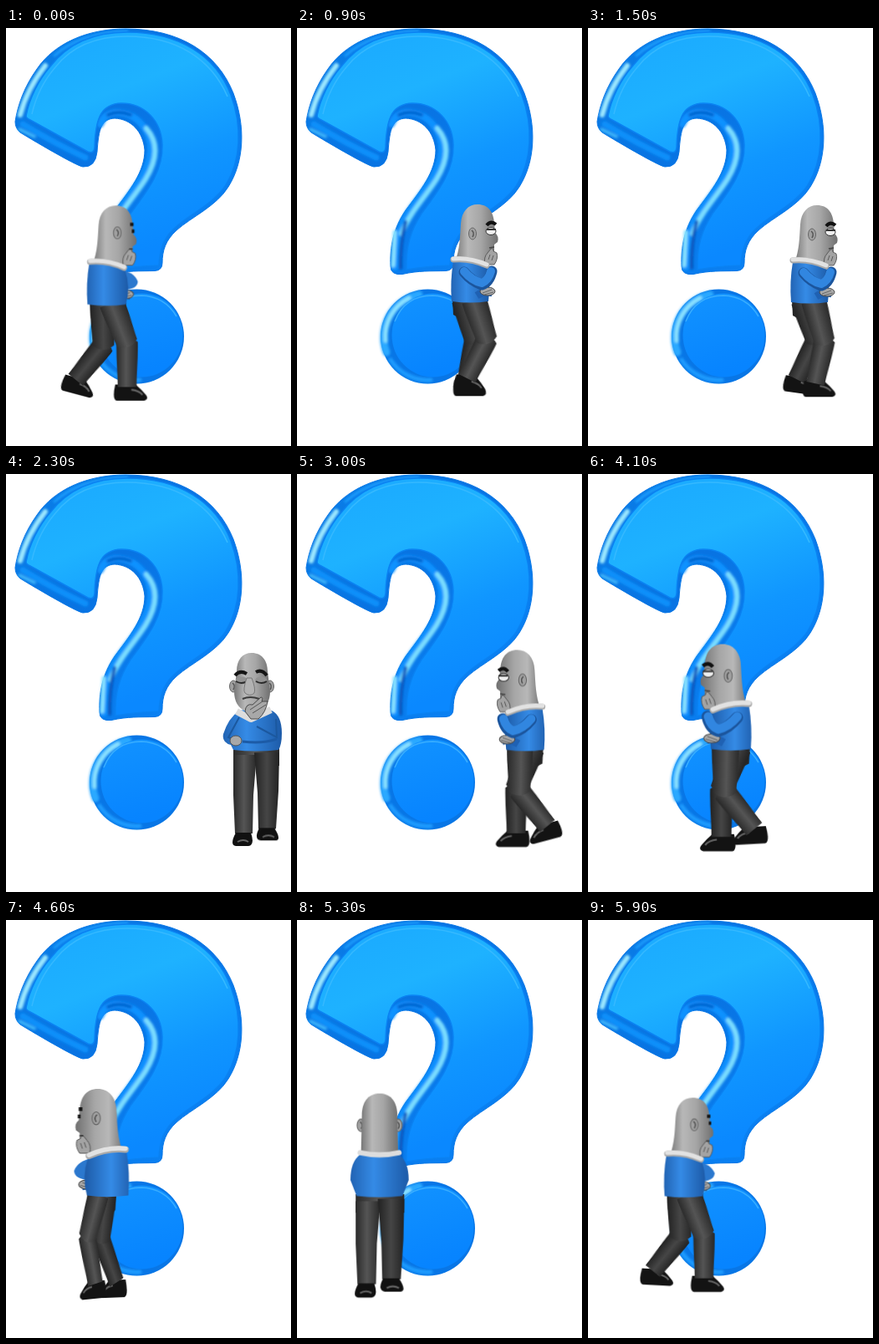
These frames come from a looping animation (341 px wide and 500 px high, 6000 ms). An HTML page without scripts:

```html
<!DOCTYPE html>
<html lang="en">
<head>
<meta charset="utf-8">
<title>Pacing thinker</title>
<style>
html, body { margin: 0; width: 100%; height: 100%; overflow: hidden; background: #fff; }
svg { display: block; width: 100%; height: 100%; }

.walker, .turn, .view { animation: 6s -5ms infinite step-end; }
.walker { animation-name: pace; }
.turn { animation-name: turn; }
.side { animation-name: side; }
.rear { animation-name: rear; }
.stride { animation-name: stride; }
.front { animation-name: front; }
.back { animation-name: back; }
.look { animation: look 6s -5ms infinite steps(5); }

.thigh, .shin, .foot { animation: 1.2s var(--lag, -5ms) infinite steps(3); }
.thigh { animation-name: thigh; }
.shin { animation-name: shin; }
.foot { animation-name: foot; }
.far { --lag: -605ms; }
.lift { animation: lift 1.2s var(--lag, -5ms) infinite steps(3); }

/* One lap; the held steps give ten poses a second */
@keyframes pace {
  0% { transform: translate(122px, 447px) scale(1.02); animation-timing-function: steps(9); }
  15% { transform: translate(207px, 441px) scale(1); animation-timing-function: steps(6); }
  25% { transform: translate(265px, 442px) scale(1); animation-timing-function: steps(3); }
  30% { transform: translate(287px, 443px) scale(1); animation-timing-function: steps(5); }
  38.333% { transform: translate(299px, 444px) scale(1); animation-timing-function: steps(5); }
  46.667% { transform: translate(281px, 446px) scale(1.02); animation-timing-function: steps(3); }
  51.667% { transform: translate(269px, 448px) scale(1.035); animation-timing-function: steps(5); }
  60% { transform: translate(222px, 450px) scale(1.065); animation-timing-function: steps(10); }
  76.667% { transform: translate(120px, 455px) scale(1.1); animation-timing-function: steps(5); }
  85% { transform: translate(93px, 452px) scale(1.07); animation-timing-function: steps(8); }
  98.333% { transform: translate(116px, 446px) scale(1.015); animation-timing-function: steps(1); }
  100% { transform: translate(122px, 447px) scale(1.02); }
}
@keyframes turn { 0%, 85% { transform: scaleX(1); } 46.66% { transform: scaleX(-1); } }
@keyframes side { 0%, 30%, 70% { visibility: hidden; } 6.66%, 46.66% { visibility: visible; } 100% { visibility: hidden; } }
@keyframes rear { 0%, 70%, 90% { visibility: visible; } 6.66%, 81.66% { visibility: hidden; } 100% { visibility: visible; } }
@keyframes stride {
  0%, 46.66%, 90% { visibility: visible; transform: none; }
  75% { visibility: visible; transform: translateX(5px) scaleX(.74); }
  30%, 81.66% { visibility: hidden; }
  100% { visibility: visible; transform: none; }
}
@keyframes front { 0%, 46.66%, 100% { visibility: hidden; } 30% { visibility: visible; } }
@keyframes back { 0%, 90%, 100% { visibility: hidden; } 81.66% { visibility: visible; } }
@keyframes look { 0%, 30% { transform: translateX(10px); } 38.333% { transform: none; } 46.667%, 100% { transform: translateX(-6px); } }

/* The legs reach full spread just before each change of foot */
@keyframes thigh {
  0%, 91.667%, 100% { transform: rotate(-21deg); }
  25% { transform: rotate(-15deg); animation-timing-function: steps(2); }
  41.667%, 50% { transform: rotate(-1deg); }
  75% { transform: rotate(-18deg); animation-timing-function: steps(2); }
}
@keyframes shin {
  0%, 91.667%, 100% { transform: rotate(21deg); }
  25% { transform: rotate(27deg); animation-timing-function: steps(2); }
  41.667%, 50% { transform: rotate(40deg); }
  75% { transform: rotate(45deg); animation-timing-function: steps(2); }
}
@keyframes foot {
  0%, 91.667%, 100% { transform: rotate(0deg); }
  25% { transform: rotate(-12deg); animation-timing-function: steps(2); }
  41.667% { transform: rotate(-36deg); animation-timing-function: steps(1); }
  50% { transform: rotate(-24deg); }
  75% { transform: rotate(-19deg); animation-timing-function: steps(2); }
}
@keyframes lift { 0%, 50%, 100% { transform: none; } 75% { transform: translateY(-4px); } }
</style>
</head>
<body>
<svg viewBox="0 0 341 500">
<defs>
  <linearGradient id="face" x1="0" y1="0" x2=".35" y2="1">
    <stop offset="0" stop-color="#1aa8ff"/><stop offset=".35" stop-color="#1eb2ff"/>
    <stop offset=".7" stop-color="#1096ff"/><stop offset="1" stop-color="#0a88ff"/>
  </linearGradient>
  <linearGradient id="rim" x1="0" y1="0" x2="1" y2="1">
    <stop offset="0" stop-color="#0a7fe8"/><stop offset=".4" stop-color="#0873e2"/><stop offset="1" stop-color="#0a86fa"/>
  </linearGradient>
  <linearGradient id="dot" x1="0" y1="0" x2=".3" y2="1">
    <stop offset="0" stop-color="#1293ff"/><stop offset="1" stop-color="#0784ff"/>
  </linearGradient>
  <linearGradient id="skin">
    <stop offset="0" stop-color="#777"/><stop offset=".3" stop-color="#b8b8b8"/>
    <stop offset=".6" stop-color="#a6a6a6"/><stop offset="1" stop-color="#707070"/>
  </linearGradient>
  <linearGradient id="shirt">
    <stop offset="0" stop-color="#2264b4"/><stop offset=".4" stop-color="#358be6"/><stop offset="1" stop-color="#1d5ba8"/>
  </linearGradient>
  <linearGradient id="cloth">
    <stop offset="0" stop-color="#2a2a2a"/><stop offset=".45" stop-color="#555"/><stop offset="1" stop-color="#282828"/>
  </linearGradient>
  <linearGradient id="shade">
    <stop offset="0" stop-color="#222"/><stop offset=".5" stop-color="#464646"/><stop offset="1" stop-color="#222"/>
  </linearGradient>
  <filter id="soft" x="-30%" y="-30%" width="160%" height="160%"><feGaussianBlur stdDeviation="1.6"/></filter>

  <path id="thigh" d="M-15-4C-15 18-13 34-12.5 46Q0 56 12.5 46C13 30 15 16 15-4Z"/>
  <path id="shin" d="M-12.5-1Q0-10 12.5-1C13 18 11 36 11 52H-11C-11 36-13 18-12.5-1Z"/>
  <g id="shoe">
    <path d="M-14-1Q-18 17-12 18H20Q26 16 22 11 16 4 10-1Z" fill="#131313"/>
    <path d="M5 5Q14 6 18 11" fill="none" stroke="#666" stroke-width="2"/>
  </g>
  <g id="hand" fill="#a3a3a3" stroke="#555" stroke-width=".9">
    <path d="M-6 8Q-8-1-3-6L1-11Q4-12 4-8L8-6Q10 1 5 8Z"/>
    <path d="M0-4L-2 2M4-3L2 3" fill="none"/>
  </g>
  <path id="skull" d="M-18-161C-12-176-12-192-11-207C-10-222-2-230 9-230C22-230 28-221 29-208L30-196Q35-192 33-185L29-182 29-172Q28-165 22-160Z" fill="url(#skin)"/>
  <g id="forearm">
    <path d="M8-121Q18-127 27-124" fill="none" stroke="#1f61b3" stroke-width="9"/>
    <ellipse cx="21" cy="-126" rx="9" ry="5" fill="#a8a8a8" stroke="#4b4b4b"/>
    <path d="M15-124L26-128M17-122L28-125" stroke="#555" stroke-width=".8"/>
  </g>
  <g id="collar" fill="none" stroke-linecap="round">
    <path d="M-20-164Q0-166 20-157" stroke="#aaa" stroke-width="7"/>
    <path d="M-20-165Q0-167 20-158" stroke="#e2e2e2" stroke-width="5"/>
  </g>
  <g id="ear">
    <ellipse rx="4.5" ry="7" fill="#a0a0a0" stroke="#666"/>
    <path d="M-1-4Q3-1 0 4" fill="none" stroke="#555" stroke-width="1.5"/>
  </g>

  <g id="frontlegs">
    <path d="M-27-116H28V-95H-27Z" fill="url(#cloth)"/>
    <g class="lift">
      <path d="M-27-108H1L-3-60-4-14H-25L-27-60Z" fill="url(#cloth)"/>
      <path d="M-24-15H-6Q-1 0-9 1H-24Q-32 0-24-15Z" fill="#111"/>
      <path d="M-22-4Q-15-8-9-4" fill="none" stroke="#666" stroke-width="2"/>
    </g>
    <g class="lift far">
      <path d="M-2-108H28L27-62 24-17H3L2-60Z" fill="url(#shade)"/>
      <path d="M4-18H22Q31-4 24-3H6Q-3-4 4-18Z" fill="#111"/>
      <path d="M8-7Q15-11 22-7" fill="none" stroke="#666" stroke-width="2"/>
    </g>
  </g>
</defs>

<g id="question">
  <path d="M11 112C14 92 22 70 37 49C58 18 98 1 143 1C208 1 253 30 272 78C287 118 285 160 266 190C252 213 222 226 204 242C191 254 187 266 187 281Q187 290 178 290.500C160 291 146 290 126 294.500Q112 296 112 285C111 262 115 240 130 218C148 194 166 172 166 146C164 124 150 109 130 108C114 109 111 120 109 148Q107 167 92 166C84 165 30 133 17 125Q11 120 11 112Z" fill="url(#rim)" stroke="#0876e6"/>
  <g fill="none" stroke-linecap="round" filter="url(#soft)">
    <path d="M20 115Q60 139 95 155" stroke="#0c90fa" stroke-width="7"/>
    <path d="M16 121L34 130" stroke="#4bc4ff" stroke-width="3"/>
    <path d="M17 104C22 84 33 63 47 45" stroke="#9ce8ff" stroke-width="6"/>
    <path d="M58 33C80 13 110 5 145 4" stroke="#1aa0ff" stroke-width="3"/>
    <path d="M113 115Q117 103 131 101C158 101 174 124 173 147C171 174 154 191 138 214C123 234 117 256 117 286" stroke="#0f92ff" stroke-width="8"/>
    <path d="M168 120C183 137 181 158 167 181C153 203 134 222 125 246" stroke="#7addff" stroke-width="6"/>
    <path d="M117 244L115 284" stroke="#8ae4ff" stroke-width="5"/>
    <path d="M130 232Q123 258 124 287" stroke="#0755bb" stroke-width="4"/>
    <path d="M122 104Q134 98 149 104" stroke="#0660cc" stroke-width="4"/>
  </g>
  <path d="M24 105C28 84 39 62 53 46C76 16 110 5 145 5C207 5 251 33 269 80C283 118 281 159 263 188C249 210 219 223 201 240C189 251 184 264 183 284Q155 285 131 289C130 262 136 242 149 222C168 196 188 172 187 140C186 110 165 90 138 90C115 91 107 105 106 143Q105 151 98 148L29 110Q24 108 24 105Z" fill="url(#face)" stroke="#0a82f2" stroke-width="1.500"/>
  <path d="M31 103C36 81 46 62 59 47C80 20 112 10 145 10C203 10 245 36 265 82" fill="none" stroke="#35b9ff" stroke-width="1.500"/>
  <circle cx="156.500" cy="369" r="56.500" fill="#0876e6"/>
  <g fill="none" stroke-linecap="round" filter="url(#soft)">
    <path d="M107 388A52 52 0 0 1 146 319" stroke="#2ba9ff" stroke-width="9"/>
    <path d="M106 374A52 52 0 0 1 134 323" stroke="#8be2ff" stroke-width="5"/>
    <path d="M112 397A53 53 0 0 0 160 421" stroke="#1f9cff" stroke-width="5"/>
  </g>
  <ellipse cx="162.500" cy="367.500" rx="49" ry="50" fill="url(#dot)"/>
  <path d="M117 351Q129 320 162 320Q190 321 204 345" fill="none" stroke="#39aeff" stroke-width="1.500"/>
</g>

<g class="walker">
  <g class="turn">
    <g class="view stride">
      <path d="M-21-116H21L20-98Q0-86-20-98Z" fill="url(#shade)"/>
      <g class="far" transform="translate(-6 -112)"><g class="thigh" fill="url(#shade)">
        <g transform="translate(0 46)"><g class="shin">
          <g transform="translate(0 50)"><g class="foot"><use href="#shoe"/></g></g>
          <use href="#shin"/>
        </g></g>
        <use href="#thigh"/>
      </g></g>
      <g transform="translate(6 -112)"><g class="thigh" fill="url(#cloth)">
        <g transform="translate(0 46)"><g class="shin">
          <g transform="translate(0 50)"><g class="foot"><use href="#shoe"/></g></g>
          <use href="#shin"/>
        </g></g>
        <use href="#thigh"/>
      </g></g>
    </g>

    <g class="view side">
      <use href="#skull"/>
      <path d="M-20-162Q0-164 20-155Q25-136 22-114Q0-111-22-114Q-24-138-20-162Z" fill="url(#shirt)"/>
      <use href="#forearm"/>
      <path d="M-7-149Q2-138 14-134Q23-137 26-150" fill="none" stroke="#1b559d" stroke-width="13" stroke-linejoin="round" stroke-linecap="round"/>
      <path d="M-7-150Q2-139 14-136Q22-139 25-150" fill="none" stroke="#3186e0" stroke-width="10" stroke-linejoin="round" stroke-linecap="round"/>
      <use href="#hand" x="24" y="-166"/>
      <use href="#collar"/>
      <use href="#ear" x="3" y="-195"/>
      <ellipse cx="25" cy="-198" rx="6" ry="4.500" fill="#eee" stroke="#333"/>
      <path d="M20-200H31" stroke="#333" stroke-width="2"/>
      <path d="M20-205Q25-211 31-206" fill="none" stroke="#111" stroke-width="4"/>
      <path d="M23-178L29-179" stroke="#444" stroke-width="1.500"/>
    </g>

    <g class="view rear">
      <use href="#skull"/>
      <use href="#hand" x="24" y="-168"/>
      <use href="#forearm"/>
      <path d="M14-155Q31-152 35-141Q35-132 18-131Z" fill="#2b78ce"/>
      <path d="M-22-162Q0-164 20-155Q27-134 21-114Q0-111-24-114Q-26-138-22-162Z" fill="url(#shirt)"/>
      <use href="#collar" x="-1"/>
      <use href="#ear" x="11" y="-198"/>
      <path d="M26-208L30-208M28-200L31-200" stroke="#151515" stroke-width="4"/>
      <path d="M25-179L29-179" stroke="#444" stroke-width="2"/>
    </g>

    <g class="view front">
      <use href="#frontlegs"/>
      <path d="M-20-161Q0-165 19-161Q31-155 31-134Q31-120 27-114Q0-111-27-114L-30-120Q-41-123-39-133Q-33-152-20-161Z" fill="url(#shirt)"/>
      <path d="M-20-153L-33-129-21-124M24-151L25-129 1-142" fill="none" stroke="#1b589f" stroke-width="2"/>
      <path d="M-16-124Q8-121 25-127" fill="none" stroke="#1c5ba7" stroke-width="3"/>
      <path d="M-23-160L-6-151 18-162" fill="none" stroke="#ddd" stroke-width="8" stroke-linejoin="round"/>
      <use href="#ear" x="-27" y="-190"/><use href="#ear" x="17" y="-190"/>
      <path d="M-23-208C-23-222-16-230-5-230C7-230 14-221 14-208L17-184Q17-166 2-160H-12Q-26-166-26-184Z" fill="url(#skin)"/>
      <g class="look">
        <path d="M-25-203Q-19-210-11-205M0-207Q7-211 13-203" fill="none" stroke="#151515" stroke-width="4"/>
        <ellipse cx="-17" cy="-197" rx="7" ry="4.500" fill="#939393"/>
        <ellipse cx="6" cy="-197" rx="7" ry="4.500" fill="#939393"/>
        <path d="M-24-196Q-17-192-11-196M0-196Q7-192 13-196" fill="none" stroke="#292929" stroke-width="2"/>
        <path d="M-11-200Q-16-185-13-182Q-7-177-2-182Q0-187-5-200Z" fill="#b2b2b2" stroke="#777"/>
        <path d="M-16-175Q-7-179 4-175" fill="none" stroke="#3c3c3c" stroke-width="2"/>
      </g>
      <path d="M-13-160Q-12-170-4-168L6-177Q9-177 7-172L14-172Q12-159 3-151L-6-151Z" fill="#a8a8a8" stroke="#494949"/>
      <path d="M-7-162L8-172M-4-158L12-168" stroke="#555"/>
      <ellipse cx="-24" cy="-125" rx="7" ry="6" fill="#a8a8a8" stroke="#555"/>
    </g>

    <g class="view back">
      <use href="#frontlegs"/>
      <path d="M-22-161Q0-166 22-161Q33-153 33-132L26-114Q0-111-26-114L-33-132Q-33-153-22-161Z" fill="url(#shirt)"/>
      <use href="#ear" x="-21" y="-194"/><use href="#ear" x="21" y="-194"/>
      <path d="M-21-162L-20-208C-19-223-11-230 0-230C11-230 19-223 20-208L21-162Z" fill="url(#skin)"/>
      <path d="M-22-163Q0-158 22-163" fill="none" stroke="#ddd" stroke-width="6" stroke-linecap="round"/>
    </g>
  </g>
</g>
</svg>
</body>
</html>
```
